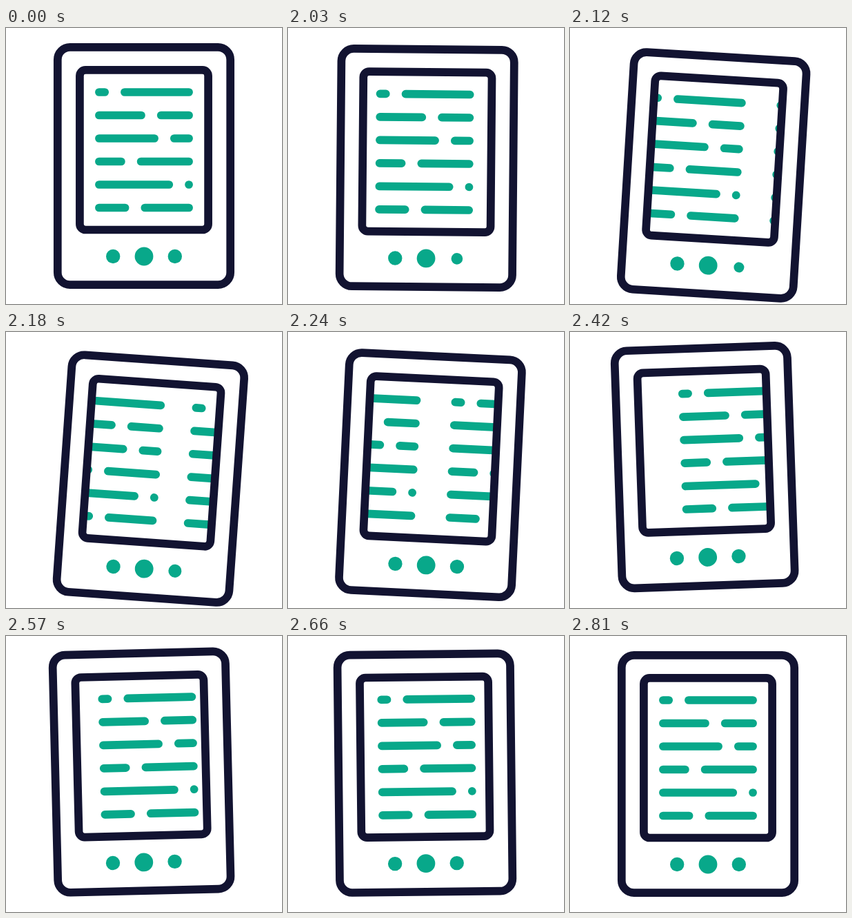
Write an HTML page with a canvas that moves like this. It is 400x400 px and loops after 2.84 s.

```html
<!DOCTYPE html>
<html lang="en">
<head>
<meta charset="utf-8">
<title>E-reader</title>
<style>
  html, body { margin: 0; width: 100%; height: 100%; overflow: hidden; background: #fff; }
  canvas { display: block; width: 400px; height: 400px; }
</style>
</head>
<body>
<canvas id="stage" width="400" height="400"></canvas>
<script>
const ctx = document.getElementById('stage').getContext('2d');
const INK = '#121331', GREEN = '#08a88a';
const LOOP = 2840, START = 2000, STEP = 30, END = 810;
const STROKE = 11.7;
const PIVOT = { x: 75, y: 338 };

// Every row is one line of text broken by a gap that starts at the given x.
const LEFT = 134.9, RIGHT = 265.1, GAP = 28.7;
const BREAKS = [143.2, 196, 215.1, 166.9, 236.3, 172.6];

// Quick start, soft landing.
const ease = u => Math.sin(Math.PI / 2 * u ** 0.85) ** 2;

// Eases through [ms, value] turning points.
function swing(t, ...keys) {
  const i = keys.findIndex(([ms]) => ms > t);
  if (i < 0) return keys[keys.length - 1][1];
  const [t0, v0] = keys[i - 1], [t1, v1] = keys[i];
  return v0 + (v1 - v0) * ease((t - t0) / (t1 - t0));
}

const tilt = t => swing(t, [0, 0], [169, 4.1], [450, -2.1], [END, 0]);
const drop = t => swing(t, [0, 0], [95, 5.9], [320, -0.4], [570, 0]);
const press = t => swing(t, [0, 1], [70, 0.62], [230, 1]);
const pageOut = t => -169 * (t / 360) ** 1.55;
const pageIn = t => 234 * Math.max(0, 1 - t / 800) ** 2.5;

function roundRect(x0, y0, x1, y1, r) {
  ctx.beginPath();
  ctx.moveTo(x0 + r, y0);
  ctx.arcTo(x1, y0, x1, y1, r);
  ctx.arcTo(x1, y1, x0, y1, r);
  ctx.arcTo(x0, y1, x0, y0, r);
  ctx.arcTo(x0, y0, x1, y0, r);
  ctx.closePath();
}

function dot(x, r) {
  ctx.beginPath();
  ctx.arc(x, 331, r, 0, Math.PI * 2);
  ctx.fill();
}

function drawPage(dx) {
  ctx.beginPath();
  BREAKS.forEach((x, i) => {
    const y = 93 + i * 33.5;
    ctx.moveTo(LEFT + dx, y);
    ctx.lineTo(x + dx, y);
    ctx.moveTo(x + GAP + dx, y);
    ctx.lineTo(RIGHT + dx, y);
  });
  ctx.stroke();
}

function screenPath() {
  roundRect(106.9, 60.9, 293.1, 292.5, 8.3);
}

function draw(t) {
  ctx.fillStyle = '#fff';
  ctx.fillRect(0, 0, 400, 400);
  ctx.save();
  ctx.translate(PIVOT.x, PIVOT.y + drop(t));
  ctx.rotate(tilt(t) * Math.PI / 180);
  ctx.translate(-PIVOT.x, -PIVOT.y);
  ctx.lineWidth = STROKE;
  ctx.lineCap = 'round';

  ctx.save();
  screenPath();
  ctx.clip();
  ctx.strokeStyle = GREEN;
  drawPage(pageOut(t));
  drawPage(pageIn(t));
  ctx.restore();

  ctx.strokeStyle = INK;
  screenPath();
  ctx.stroke();
  roundRect(74.8, 27.9, 325.2, 372.2, 18);
  ctx.stroke();

  ctx.fillStyle = GREEN;
  dot(155.2, 10.2);
  dot(200, 13.4);
  dot(244.8, 10.2 * press(t));
  ctx.restore();
}

const origin = performance.now();

function tick() {
  const time = (performance.now() - origin) % LOOP;
  const t = Math.floor((time - START) / STEP) * STEP;
  draw(t < 0 || t >= END ? 0 : t);
  requestAnimationFrame(tick);
}
tick();
</script>
</body>
</html>
```
